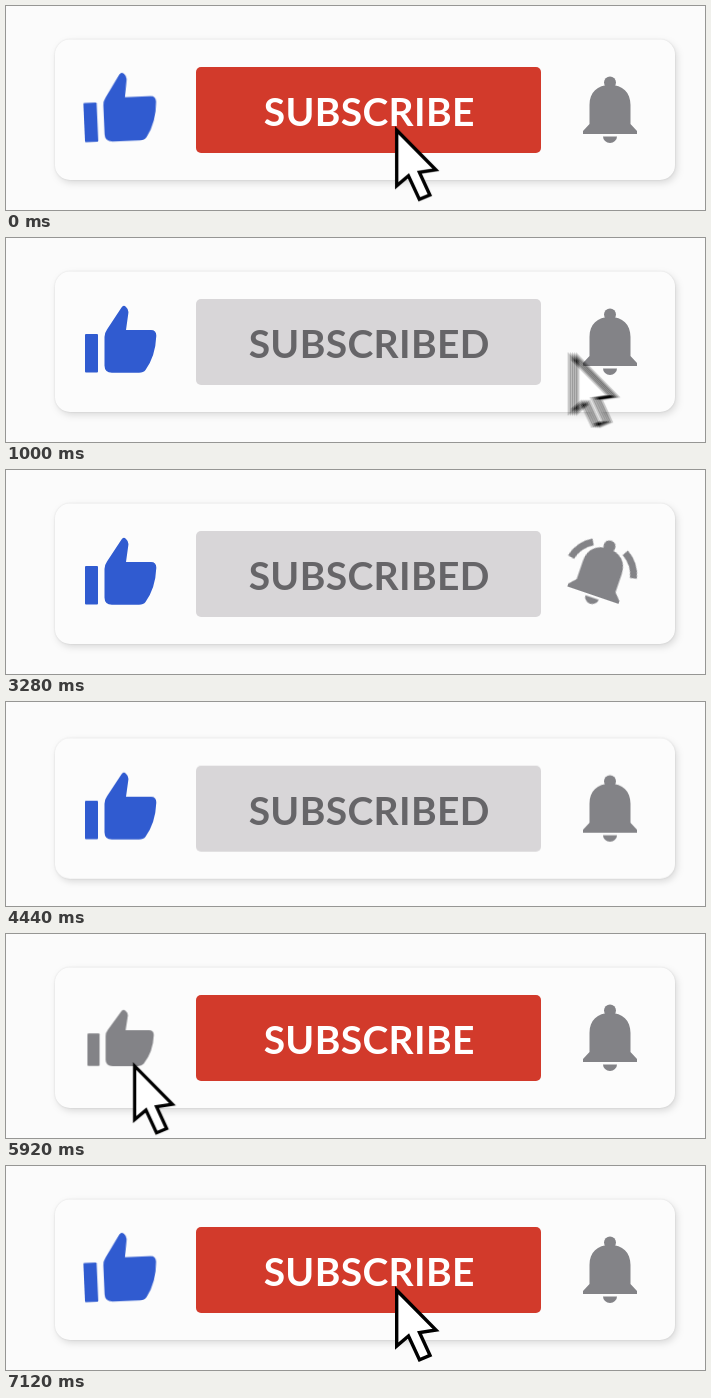
Recreate the animation shown at these times as an HTML page. Size 699 by 204 pixels, loop 7.16 s.

```html
<!DOCTYPE html>
<html lang="en">
<head>
<meta charset="utf-8">
<title>Subscribe button</title>
<style>
  html, body { margin: 0; width: 100%; height: 100%; overflow: hidden; background: #fbfbfb; }
  svg { display: block; width: 699px; height: 204px; }

  :root {
    --loop: 7160ms;
    --grey: #838387;
    --blue: #305bd0;
    --swing: cubic-bezier(.37, 0, .63, 1);
    --glide: cubic-bezier(.65, 0, .35, 1);
  }

  .card   { animation: card var(--loop) infinite; }
  .panel  { fill: #fcfcfc; filter: drop-shadow(0 0 1px rgba(0,0,0,.1)) drop-shadow(2px 3px 3.5px rgba(0,0,0,.13)); }
  .thumb  { fill: var(--grey); transform-origin: 114px 118px;
            animation: thumb var(--loop) var(--swing) infinite, like var(--loop) infinite; }
  .button { transform-origin: 362.5px 104px; animation: button var(--loop) var(--swing) infinite; }
  .face   { fill: #d23a2b; animation: face var(--loop) infinite; }
  .label  { font: 700 39px Lato, "Open Sans", sans-serif; letter-spacing: .35px; text-anchor: middle; }
  .before { fill: #fff; animation: before var(--loop) infinite; }
  .after  { fill: #666568; opacity: 0; animation: after var(--loop) infinite; }
  .bell   { fill: var(--grey); transform-origin: 604px 75px; animation: ring var(--loop) var(--swing) infinite; }
  .dent   { transform-origin: 604px 104px; animation: dent var(--loop) var(--swing) infinite; }
  .waves  { fill: none; stroke: var(--grey); stroke-width: 7; opacity: 0; animation: waves var(--loop) infinite; }

  /* Cursor copies run slightly apart and add up to a motion blur. */
  .trail  { isolation: isolate; }
  .cursor { opacity: .2; mix-blend-mode: plus-lighter; }
  .x, .y, .tap { animation-duration: var(--loop); animation-delay: var(--lead); animation-iteration-count: infinite; }
  .x   { animation-name: cursor-x; animation-timing-function: var(--glide); }
  .y   { animation-name: cursor-y; animation-timing-function: var(--swing); }
  .tap { animation-name: tap; fill: #fff; stroke: #000; stroke-width: 3.4; }

  @keyframes card {
    0%, 61.17% { transform: none; animation-timing-function: cubic-bezier(.5, 0, .8, .6); }
    67.6%, 73.04% { transform: translateY(185px); animation-timing-function: ease-in; }
    73.74% { transform: translateY(152px); animation-timing-function: cubic-bezier(.3, .6, .5, 1); }
    76.54% { transform: translateY(-20px); animation-timing-function: ease-in-out; }
    80.17%, 100% { transform: none; }
  }
  @keyframes thumb {
    0%, 99.44%, 100% { transform: rotate(-2.5deg) scale(1.02); }
    3.35%, 81.56% { transform: none; }
    82.68% { transform: scale(.93, .84); }
    83.52% { transform: scale(.9, .82); }
    87.15% { transform: rotate(-13deg) scale(1.15); }
    91.62% { transform: rotate(-12deg) scale(1.13); }
  }
  @keyframes like {
    0%, 67.6% { fill: var(--blue); }
    67.61%, 82.7% { fill: var(--grey); }
    84%, 100% { fill: var(--blue); }
  }
  @keyframes button {
    0%, 10.61%, 100% { transform: none; }
    1.96% { transform: scale(.96); }
    5.87% { transform: scale(1.046); }
  }
  @keyframes face {
    0%, 1.96% { fill: #d23a2b; }
    4.47%, 67.6% { fill: #d8d6d8; }
    67.61%, 100% { fill: #d23a2b; }
  }
  @keyframes before {
    0%, 1.96% { opacity: 1; }
    4.47%, 67.6% { opacity: 0; }
    67.61%, 100% { opacity: 1; }
  }
  @keyframes after {
    0%, 1.96% { opacity: 0; }
    4.47%, 67.6% { opacity: 1; }
    67.61%, 100% { opacity: 0; }
  }
  @keyframes ring {
    0%, 22.9%, 60.2%, 100% { transform: none; }
    26.54% { transform: rotate(-20deg); }
    30.59% { transform: rotate(32deg); }
    34.22% { transform: rotate(-27deg); }
    37.99% { transform: rotate(23deg); }
    41.76% { transform: rotate(-18deg); }
    45.67% { transform: rotate(19deg); }
    49.3%  { transform: rotate(-16deg); }
    52.93% { transform: rotate(17deg); }
    56.56% { transform: rotate(-17deg); }
  }
  @keyframes dent {
    0%, 20.1%, 23.5%, 100% { transform: none; }
    21.5% { transform: scale(.9); }
  }
  @keyframes waves {
    0%, 32.1%, 60.06%, 100% { opacity: 0; }
    33.8%, 57.96% { opacity: 1; }
  }
  @keyframes cursor-x {
    0%, 9.25% { transform: translateX(389px); }
    17.07% { transform: translateX(617px); }
    22.9% { transform: translateX(617px); animation-timing-function: ease-in; }
    33.52% { transform: translateX(649px); }
    75.42% { transform: translateX(165px); animation-timing-function: ease-out; }
    81.84%, 91.34% { transform: translateX(127px); }
    99.3%, 100% { transform: translateX(389px); }
  }
  @keyframes cursor-y {
    0%, 9.25% { transform: translateY(120px); }
    13.13% { transform: translateY(113.5px); }
    17.07% { transform: translateY(118px); }
    22.9% { transform: translateY(118px); animation-timing-function: ease-in; }
    33.52% { transform: translateY(214px); }
    75.42% { transform: translateY(230px); animation-timing-function: ease-out; }
    81.84%, 91.34% { transform: translateY(128px); }
    95.39% { transform: translateY(136px); }
    99.3%, 100% { transform: translateY(120px); }
  }
  @keyframes tap {
    0%, 3.35%, 19.55%, 22.35%, 81.84%, 84.64%, 100% { transform: none; }
    1.4%, 20.67% { transform: scale(.92); }
    82.96% { transform: scale(.96); }
  }
</style>
</head>
<body>
<svg viewBox="0 0 699 204">
  <g class="card">
    <rect class="panel" x="49" y="33.5" width="620" height="140.5" rx="15"/>

    <g class="thumb">
      <rect x="79" y="96" width="13" height="38.5" rx="1"/>
      <path d="M98.500 99Q98.500 95 101 91.500L115.500 69.500Q117.500 66.500 120 69Q123 71.500 122.300 75.500L120 92H145Q150.500 92 150.300 98Q149.500 118 139.500 132Q137.500 134.800 133 134.800H106Q98.500 134.500 98.500 127.500z"/>
    </g>

    <g class="button">
      <rect class="face" x="190" y="61" width="345" height="86" rx="5"/>
      <text class="label before" x="363.2" y="120">SUBSCRIBE</text>
      <text class="label after" x="363.2" y="120">SUBSCRIBED</text>
    </g>

    <g class="bell">
      <g class="dent">
        <circle cx="604" cy="76.5" r="6"/>
        <path d="M577 128v-3l6.500-7V99c0-13 8-20 20.500-20s20.500 7 20.500 20v19l6.500 7v3z"/>
        <path d="M597 130.500h14a7 6.500 0 0 1-14 0z"/>
      </g>
      <path class="waves" d="M587 77.500A34 34 0 0 0 571 99M621 77.500A34 34 0 0 1 637 99"/>
    </g>
  </g>

  <g class="trail">
    <g class="cursor"><g class="x"><g class="y">
      <path class="tap" d="M1.700 4.200V60L13.500 50 24.500 73.700 35 69.300 24.500 46.500 41 44z"/>
    </g></g></g>
  </g>
</svg>
<script>
  const trail = document.querySelector('.trail');
  const cursor = trail.firstElementChild;
  cursor.style.setProperty('--lead', '0ms');
  for (let i = 1; i < 5; i++) {
    const copy = cursor.cloneNode(true);
    copy.style.setProperty('--lead', `${-3 * i}ms`);
    trail.append(copy);
  }
</script>
</body>
</html>
```
